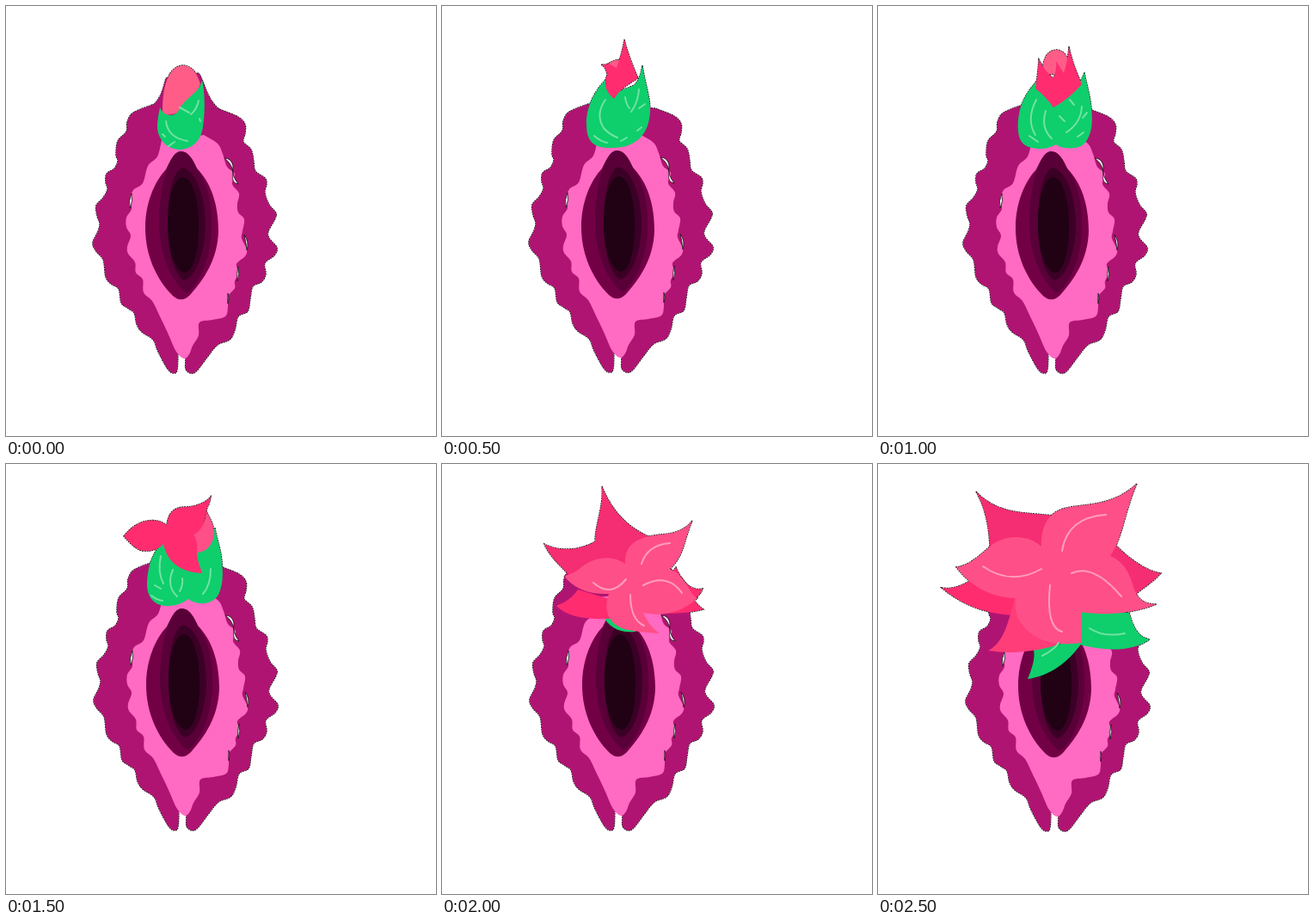
Animation of 500 by 500 pixels, one loop 3000 ms. Source, as an HTML page:

```html
<!DOCTYPE html>
<html lang="en">
<head>
<meta charset="utf-8">
<title>Bloom</title>
<style>
  html, body { margin: 0; height: 100%; overflow: hidden; background: #fff; }
  svg { display: block; width: 100%; height: 100%; }
  .edge path { fill: none; stroke: #111; stroke-width: 1.4; stroke-dasharray: 2 .8; }
  .gap { fill: #fff; stroke: #111; stroke-width: .8; }
  .vein { fill: none; stroke-width: 2; stroke-linecap: round; }
</style>
</head>
<body>
<svg id="stage" viewBox="0 0 500 500"></svg>
<script>
const GREEN = '#0fce6c', LEAF_VEIN = '#70e3a2', RED = '#ff2d70', DEEP = '#f52d72',
      ROSE = '#ff4f88', SOFT = '#ff5c88', PETAL_VEIN = '#ff9dc0', PURPLE = '#b01472';
const STEP = 500;

// Smooth curve through "x,y x,y ..." points
function smooth(text) {
  const p = text.trim().split(/\s+/).map(s => s.split(',').map(Number));
  const at = i => p[Math.max(0, Math.min(p.length - 1, i))];
  let d = 'M' + p[0];
  for (let i = 0; i < p.length - 1; i++) {
    const [a, b, c, e] = [at(i - 1), at(i), at(i + 1), at(i + 2)];
    const h1 = b.map((v, k) => (v + (c[k] - a[k]) / 6).toFixed(1));
    const h2 = c.map((v, k) => (v - (e[k] - b[k]) / 6).toFixed(1));
    d += `C${h1} ${h2} ${c}`;
  }
  return d;
}

const leftEdge = smooth(`170,115 148,124 141,135 140,146 130,157 128,173 130,180 126,189 117,195
  116,205 118,213 113,223 105,232 106,244 109,253 107,262 101,275 104,284 112,293 114,299 116,315
  122,323 131,329 134,345 141,351 149,357 152,370 158,379 171,388 177,402 188,422 195,427 199,423 200,404`);
const rightEdge = smooth(`209,410 209,422 215,427 222,424 235,407 246,394 260,388 266,377 270,361
  281,355 284,340 287,326 297,321 302,312 301,299 312,290 315,281 306,270 305,262 312,249 314,241
  306,231 301,217 303,207 301,200 290,192 288,181 285,167 276,158 278,148 278,138 270,129 248,120`);
const outer = leftEdge + rightEdge.replace('M', 'L') + 'Z';
const inner = smooth(`181,156 176,175 165,186 159,206 148,214 145,225 146,236 140,246 140,257 145,267
  141,280 142,288 150,298 151,310 159,318 160,333 170,343 178,359 188,380 198,402 207,410 213,405
  217,395 224,383 225,368 240,365 255,361 258,350 258,338 266,328 266,320 271,310 268,300 278,291
  280,283 274,270 275,262 277,248 270,240 269,230 271,218 263,207 266,195 257,187 252,172 246,160 230,150`) + 'Z';

const gaps = ['M146 218Q142 227 144 235Q148 227 146 218Z',
  'M254 177Q262 177 264 186Q262 197 270 207Q262 206 264 196Q264 184 254 177Z',
  'M277 266Q283 274 280 284Q279 274 277 266Z',
  'M270 303Q272 312 269 320Q268 311 270 303Z',
  'M258 334Q260 340 258 346Z'];

const hollow = [
  ['#720045', 'M203 169C212 169 217 178 222 189C238 205 247 230 247 262C246 295 230 318 214 336Q204 346 194 337C175 318 162 290 162 258C162 230 172 205 186 190C191 180 195 170 203 169Z'],
  ['#590038', 'M203 169C212 169 217 178 222 189C236 208 240 235 239 262C237 300 222 326 210 334C190 318 178 285 178 252C178 225 182 206 187 190C191 180 195 170 203 169Z'],
  ['#3b0025', 'M205 188C222 192 232 224 232 256C231 290 220 316 207 319C195 312 188 285 188 252C188 220 194 192 205 188Z'],
  ['#210114', 'M206 199C217 200 224 226 224 256C224 288 217 309 208 310C196 308 188 284 188 252C188 224 195 200 206 199Z']];

// Each pose: body shift, filled shapes from back to front, leaf veins, petal veins
const poses = [
  { shift: [0, 0], shapes: [
      [PURPLE, 'M170 116C180 108 182 98 186 84L224 78C231 88 233 108 248 120Z'],
      [SOFT, 'M182 128C181 95 188 70 206 69C217 70 223 79 226 91L212 122Z'],
      [GREEN, 'M179 118C184 129 194 129 200 123C204 112 217 104 223 97Q227 92 228 86C231 98 232 122 229 140C227 158 215 167 201 167C183 165 175 151 176 137Q177 126 179 118Z']],
    leaf: 'M186 134Q188 153 211 157M202 118L213 124M224 110Q222 120 215 126M225 131l1 3M189 163l7-5M182 149l3 3' },
  { shift: [0, -1], shapes: [
      [GREEN, 'M190 86C178 98 167 118 168 138C168 157 176 165 195 165C225 166 241 150 242 122C242 105 236 90 233 69C231 80 229 86 224 92L204 100Z'],
      [RED, 'M212 39C216 55 222 70 228 84C216 91 206 98 200 108C191 100 187 92 192 80C191 74 189 70 185 68C192 70 200 62 206 63Q210 52 212 39Z'],
      [SOFT, 'M194 67Q200 62 206 63L203 72Z']],
    leaf: 'M190 109Q178 126 188 142Q194 149 204 153M213 106Q214 114 218 119M229 97Q228 112 220 123M236 114l-7 5M227 145l5-4M177 151Q185 158 192 159M208 157l7-4' },
  { shift: [-2, 0], shapes: [
      [GREEN, 'M184 88C166 108 162 125 163 145C164 160 172 166 190 166C197 166 203 163 207 161C212 166 232 168 240 160C249 150 250 135 248 118C246 100 242 90 240 77C236 88 230 98 225 100Z'],
      [SOFT, 'M192 80C190 60 198 51 208 51C218 52 222 60 222 78Z'],
      [RED, 'M187 62Q186 78 183 96Q195 105 204 118Q222 108 237 91C230 75 225 62 222 47Q221 62 216 78L207 64Q208 74 204 84Q194 76 187 62Z']],
    leaf: 'M184 109Q172 132 183 150M195 122Q189 142 202 154M211 128l6 6M237 117Q236 136 219 147M243 124l-5 6M239 147l-7 5M176 151l10 7M223 109l5 6' },
  { shift: [1, -1], shapes: [
      [GREEN, 'M187 88C170 100 164 120 164 142C165 158 175 165 188 165C200 165 208 160 212 157C222 165 240 164 247 152C254 138 252 120 250 105C248 95 245 85 243 75L220 90Z'],
      [RED, 'M137 84C150 66 172 60 187 71C188 58 195 49 210 50C222 49 232 45 238 38C237 48 232 52 233 56L222 103C222 112 226 120 228 127C208 126 188 118 183 93C178 100 165 103 155 100C148 96 142 90 137 84Z'],
      [ROSE, 'M218 82C228 78 232 66 233 55C240 68 243 75 242 84C239 97 230 103 222 103C223 95 222 88 218 82Z']],
    leaf: 'M180 107Q176 126 183 139M194 123Q186 142 199 154M205 133Q206 141 202 148M238 122Q238 141 229 151M173 141l7 4M169 153Q175 158 182 159' },
  { shift: [1, -1], shapes: [
      [GREEN, 'M187 176C194 190 206 197 225 195L222 176Z'],
      [DEEP, 'M186 26C200 60 220 75 240 84L230 130H180L150 132C138 118 125 108 119 93C140 104 165 98 178 90C178 70 188 50 186 26Z'],
      [RED, 'M133 165C145 160 152 155 158 146L205 160L194 180C165 181 145 177 133 165Z'],
      [RED, 'M272 120C280 138 290 148 303 145Q300 154 292 157Q298 165 304 169C285 174 262 176 236 170Z'],
      [ROSE, 'M291 66C276 84 258 80 241 84C222 88 212 98 213 116C195 104 175 110 162 120Q153 128 142 130C152 144 170 152 194 151C187 170 194 186 212 192Q230 196 253 197C243 190 238 182 234 173C258 178 280 172 297 156C286 150 284 130 265 122C281 108 281 90 291 66Z']],
    petal: 'M232 116Q239 94 265 92M176 138Q196 156 214 134M219 152Q219 181 235 188M234 141Q262 126 279 150' },
  { shift: [1, 0], shapes: [
      [GREEN, 'M236 170L292 173C297 190 302 201 316 204C295 219 262 218 231 209Z'],
      [GREEN, 'M181 216C200 212 220 206 237 208C220 232 200 246 174 250C179 238 183 226 181 216Z'],
      [DEEP, 'M114 32C140 60 175 56 203 60L200 100L130 97C129 70 124 50 114 32Z'],
      [DEEP, 'M275 93C290 108 310 124 329 127C318 139 306 146 299 152L260 120Z'],
      [RED, 'M74 144C95 147 108 133 125 127L190 150L180 176C140 178 105 170 74 144Z'],
      ['#ff3d78', 'M160 153C152 180 148 207 128 217C160 222 192 217 218 207L200 160Z'],
      [ROSE, 'M301 23C270 51 240 45 215 52C196 58 189 76 190 96C172 80 145 83 130 96C115 109 105 118 91 120C108 142 130 155 160 156C156 178 172 198 195 206Q214 211 237 208L236 172C265 177 300 173 324 163C308 163 302 156 298 146C292 123 283 112 270 107C284 88 286 58 301 23Z']],
    leaf: 'M246 191Q262 202 287 197M191 223Q205 216 210 208',
    petal: 'M214 101Q220 62 265 59M122 119Q155 142 190 122M200 141Q195 190 214 195M225 127Q250 115 283 154' }
];

const fill = ([color, d]) => `<path fill="${color}" d="${d}"/>`;
const vein = (color, d) => d ? `<path class="vein" stroke="${color}" d="${d}"/>` : '';

function picture({ shift, shapes, leaf, petal }) {
  const body = s => `<g transform="translate(${shift})">${s}</g>`;
  const edges = body(fill([PURPLE, outer])) + shapes.map(fill).join('');
  return `<g class="edge">${edges}</g>` +
    body([[PURPLE, outer], ['#ff6ac2', inner], ...hollow].map(fill).join('') +
      gaps.map(d => `<path class="gap" d="${d}"/>`).join('')) +
    shapes.map(fill).join('') + vein(LEAF_VEIN, leaf) + vein(PETAL_VEIN, petal);
}

const stage = document.getElementById('stage');
stage.innerHTML = poses.map(p => `<g>${picture(p)}</g>`).join('');
const layers = [...stage.children];

function draw(now) {
  const current = Math.floor(now / STEP) % layers.length;
  layers.forEach((g, i) => g.setAttribute('display', i === current ? 'inline' : 'none'));
}
function loop() {
  draw(performance.now() - start);
  requestAnimationFrame(loop);
}
const start = performance.now();
loop();
</script>
</body>
</html>
```
